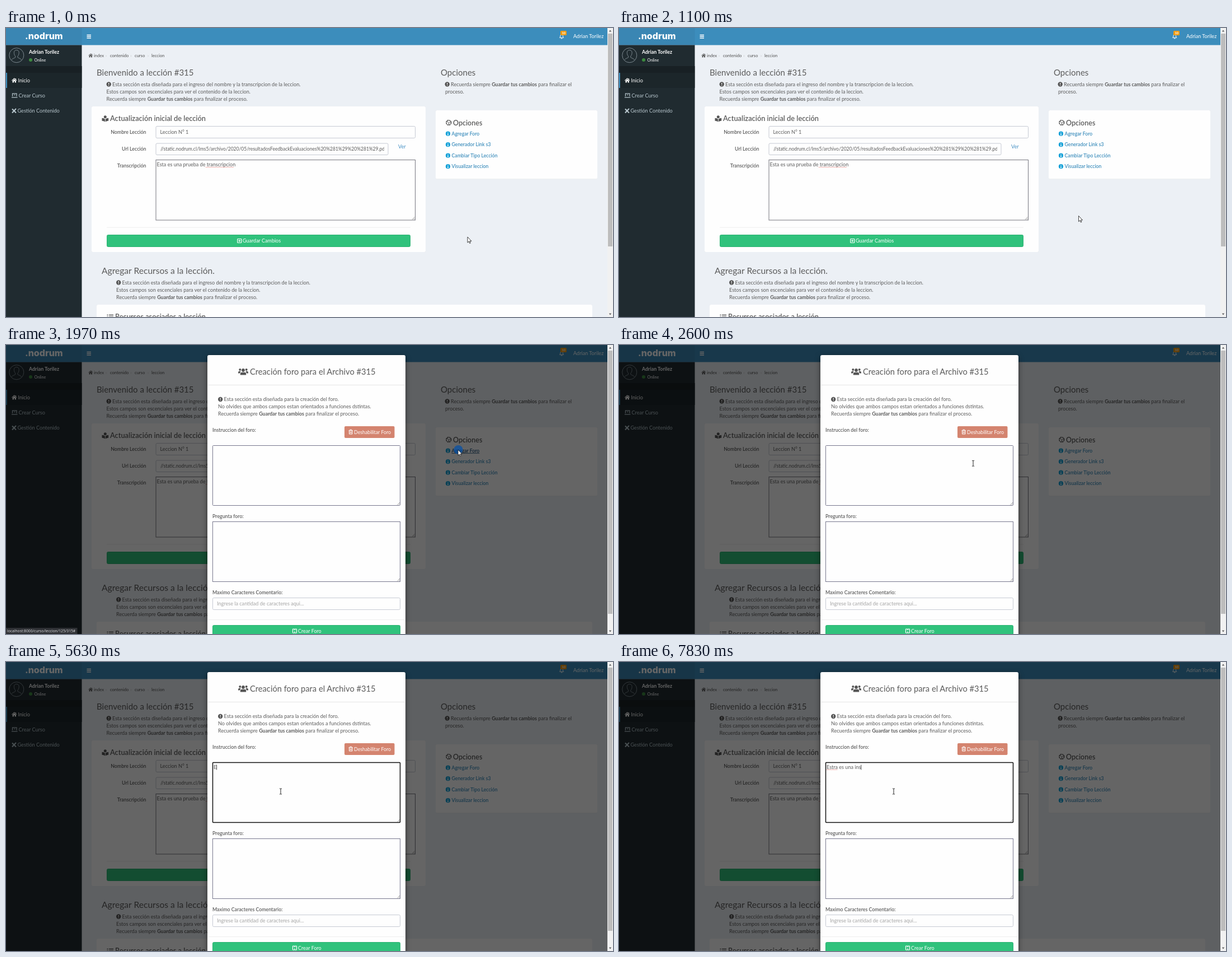
Write an HTML page that moves like this. It is 1085 by 516 pixels and loops after 8 s.

```html
<!DOCTYPE html>
<html lang="es">
<head>
<meta charset="utf-8">
<title>Lección</title>
<style>
html, body { margin: 0; width: 100%; height: 100%; overflow: hidden; background: #ecf0f5; }
svg { display: block; width: 1085px; height: 516px; }
text { font: 9.1px Lato, sans-serif; fill: #5c5c5c; white-space: pre; }
.b { font-weight: 700; font-size: 8.9px; }
.label { font-weight: 600; font-size: 8.8px; }
.end { text-anchor: end; }
.h1 { font-size: 15px; }
.h2 { font-weight: 600; font-size: 12.8px; }
.white { fill: #fff; }
.crumb { font-size: 7.6px; fill: #505050; }
.sep { font-size: 7px; fill: #bbb; }
.menu { fill: #b8c7ce; }
.link { font-weight: 600; font-size: 8.7px; fill: #3c8dbc; }
.link.on { fill: #23527c; text-decoration: underline; }
.logo { font: 800 16px Inter, sans-serif; fill: #fff; }
.card { fill: #fefefe; filter: drop-shadow(0 .7px .5px #0002); }
.field { fill: #fefefe; stroke: #c6cad3; }
.area { fill: #fefefe; stroke: #76767f; }
.modal .area { stroke: #77778e; }
.modal .area.focus { stroke: #101010; stroke-width: 1.5; }
.sheet { fill: #fefefe; filter: drop-shadow(0 3px 5px #0008); }
.btn { fill: #30c27c; stroke: #2bb272; }
.rule { stroke: #eee; }
.wavy { fill: none; stroke: #e0433a; stroke-width: .7; stroke-dasharray: 1.2 .9; }
.grip { fill: none; stroke: #777; stroke-width: .7; }
.line { fill: none; stroke: currentColor; stroke-width: 1.2; }
.status { font: 6.75px "Open Sans", sans-serif; fill: #e2e3e6; }
.pointer { fill: #fff; stroke: #111; stroke-width: .8; stroke-linejoin: round; }
</style>
</head>
<body>
<svg viewBox="0 0 1085 516">
<defs>
  <g id="warn"><circle r="4.2" fill="currentColor"/><path d="M0-2.6V.6M0 1.5V2.7" stroke="#fefefe" stroke-width="1.2"/></g>
  <g id="info"><circle r="4.1" fill="#17a2d8"/><path d="M0-2.7V-1.5M0-.7V2.5M-1 2.3H1" stroke="#fff" stroke-width="1.1"/></g>
  <path id="home" fill="currentColor" d="M0-4.2 4.7 0 4 .7 0-2.8-4 .7-4.7 0ZM0-2 3.2.8V4H.9V1.4H-.9V4H-3.2V.8ZM2.2-3.6H3.2V-1.6L2.2-2.5Z"/>
  <path id="grip" class="grip" d="M-6-1.5-1.5-6M-3.5-1.5-1.5-3.5"/>
  <rect id="box" x="-3.5" y="-3.5" width="7" height="7" rx=".8" class="line"/>
  <path id="arrow" class="pointer" d="M0 0V10.2L2.3 8 3.8 11.5 5.4 10.8 3.9 7.5H7Z"/>
  <path id="hand" class="pointer" d="M-.9.8Q0-.6.9.8V5L2.7 5.3 6 6.2Q7 6.6 6.8 8L5.6 13H.2L-2.8 8.6Q-3.2 7.2-2 7.3L-.9 8.2Z"/>
  <path id="ibeam" fill="none" stroke="#222" d="M-2-5H-.5L0-4.5.5-5H2M0-4.5V4.5M-2 5H-.5L0 4.5.5 5H2"/>
  <clipPath id="urlClip"><rect x="275" y="207" width="401" height="19"/></clipPath>
</defs>

<rect width="1085" height="516" fill="#ecf0f5"/>

<!-- top bar -->
<rect width="1075" height="30.5" fill="#3c8dbc"/>
<rect width="135.5" height="30.5" fill="#3a86b3"/>
<text class="logo" x="34" y="20">.nodrum</text>
<path d="M144.500 12.500h7.500m-7.500 2.800h7.500m-7.500 2.800h7.500" stroke="#fff" stroke-width="1.5"/>
<path d="M989.700 17.300Q991 16 991 13.700Q991.200 11.500 993.200 11.500T995.400 13.700Q995.400 16 996.700 17.300ZM992 18.800h2.400" fill="none" stroke="#fff"/>
<rect x="991" y="5" width="11" height="8" rx="1.5" fill="#f39c12"/>
<text class="white" x="993.500" y="11" style="font-size:5.6px;font-weight:700">10</text>
<text class="white" x="1014" y="18">Adrian Torilez</text>

<!-- sidebar -->
<rect y="30.500" width="135.500" height="486" fill="#202b30"/>
<rect y="68" width="135.500" height="12" fill="#182024"/>
<rect y="80" width="135.500" height="27" fill="#1c262a"/>
<rect y="80" width="2" height="27" fill="#3c8dbc"/>
<g fill="none" stroke="#87939a" stroke-width=".9">
  <circle cx="18.800" cy="48.700" r="13"/>
  <path d="M18.800 39.500c-3.600 0-4.800 2.700-4.300 6 .4 2.600 1.400 4 2.200 4.800v2.200c-1.500 1.500-5 1.600-6.700 4.300M18.800 39.500c3.600 0 4.800 2.700 4.300 6-.4 2.600-1.400 4-2.200 4.800v2.200c1.500 1.500 5 1.600 6.700 4.300"/>
</g>
<text class="white b" x="41" y="45.500">Adrian Torilez</text>
<circle cx="44" cy="57" r="3" fill="#3c8a3f"/>
<text class="white" x="50.500" y="59.500" style="font-size:7.15px">Online</text>
<use href="#home" x="14.800" y="93.500" color="#fff"/>
<text class="white" x="21.500" y="96.500">Inicio</text>
<g color="#b8c7ce">
  <path class="line" d="M11.500 122v-4.800h7.500v4.800M10 123.800h10.500M14 119.500h2.500"/>
  <path class="line" style="stroke-width:2" d="M11 144.500l7 7M18 144l-7 7.500"/>
</g>
<text class="menu" x="22.500" y="124">Crear Curso</text>
<text class="menu" x="20.500" y="151">Gestión Contenido</text>

<!-- breadcrumb -->
<use href="#home" color="#505050" transform="translate(151.300 49) scale(.85)"/>
<text class="crumb" x="157" y="52">index</text>
<text class="crumb" x="186" y="52">contenido</text>
<text class="crumb" x="230" y="52">curso</text>
<text class="crumb" x="260" y="52">leccion</text>
<text class="sep" x="178" y="51.500">›</text>
<text class="sep" x="222.500" y="51.500">›</text>
<text class="sep" x="253" y="51.500">›</text>

<!-- introductions -->
<text class="h1" x="162" y="85">Bienvenido a lección #315</text>
<g id="intro" color="#555">
  <use href="#warn" x="183.700" y="100.500"/>
  <text x="190" y="103.800">Esta sección esta diseñada para el ingreso del nombre y la transcripcion de la leccion.</text>
  <text x="179.500" y="116.800">Estos campos son escenciales para ver el contenido de la leccion.</text>
  <text x="179.500" y="129.800">Recuerda siempre <tspan class="b">Guardar tus cambios</tspan> para finalizar el proceso.</text>
</g>
<use href="#intro" x="17.500" y="354"/>
<text class="h1" x="777" y="85">Opciones</text>
<use href="#warn" x="788.700" y="100.500" color="#555"/>
<text x="795" y="103.800">Recuerda siempre <tspan class="b">Guardar tus cambios</tspan> para finalizar el</text>
<text x="785" y="116.800">proceso.</text>

<!-- lesson form -->
<rect class="card" x="153" y="140" width="597" height="260" rx="2"/>
<g fill="#555">
  <circle cx="177.300" cy="158.700" r="2.500"/>
  <path d="M171.500 160.800q3.500 0 5.400 1.700v5q-2-1.600-5.400-1.700ZM183.200 160.800q-3.500 0-5.400 1.700v5q2-1.600 5.400-1.700Z"/>
</g>
<text class="h2" x="186" y="166">Actualización inicial de lección</text>
<text class="label end" x="250.500" y="189">Nombre Lección</text>
<text class="label end" x="250.500" y="219">Url Lección</text>
<text class="label end" x="250.500" y="249">Transcripción</text>
<rect class="field" x="268" y="175.500" width="463.500" height="21" rx="2"/>
<text x="275.500" y="189">Leccion N° 1</text>
<rect class="field" x="268" y="206" width="415" height="20.500" rx="2"/>
<text x="276" y="219" clip-path="url(#urlClip)" style="font-size:8.5px">//static.nodrum.cl/lms5/archivo/2020/05/resultadosFeedbackEvaluaciones%20%281%29%20%281%29.pdf</text>
<text x="701" y="215" style="fill:#4590c4">Ver</text>
<rect class="area" x="268" y="235.500" width="463.500" height="107.500"/>
<use href="#grip" x="732" y="343.500"/>
<text x="269.500" y="247" style="font-size:9.05px">Esta es una prueba de transcripcion</text>
<path class="wavy" d="M357 248.700H406.500"/>
<path class="rule" d="M180 356H723"/>
<rect class="btn" x="180.500" y="369.500" width="542" height="21" rx="2"/>
<g color="#fff"><use href="#box" x="417.300" y="380"/><path class="line" d="M415.300 380h4m-2-2v4"/></g>
<text class="white" x="423" y="383" style="font-size:9px">Guardar Cambios</text>

<!-- resources -->
<text x="171" y="438.500" style="font-size:15.6px">Agregar Recursos a la lección.</text>
<rect class="card" x="162" y="494" width="886" height="40" rx="2"/>
<path d="M180.500 512.500h2m1.500 0h8M180.500 516h2m1.500 0h8M180.500 519.500h2m1.500 0h8" stroke="#555" stroke-width="1.700"/>
<text class="h2" x="195" y="520">Recursos asociados a lección</text>

<!-- options -->
<rect class="card" x="768" y="147" width="289" height="122.500" rx="2"/>
<circle cx="791.300" cy="169" r="4.300" fill="none" stroke="#555" stroke-width="1.700" stroke-dasharray="2.600 .8"/>
<path d="M788 166l3.500 3.500 4-3M791.500 169.500v3" fill="none" stroke="#555"/>
<text class="h2" x="799" y="173.500" style="font-size:12.5px">Opciones</text>
<g id="links">
  <use href="#info" x="790" y="188.700"/><text class="link" x="796.500" y="191.800">Agregar Foro</text>
  <use href="#info" x="790" y="208.200"/><text class="link" x="796.500" y="211.300">Generador Link s3</text>
  <use href="#info" x="790" y="227.700"/><text class="link" x="796.500" y="230.800">Cambiar Tipo Lección</text>
  <use href="#info" x="790" y="247.200"/><text class="link" x="796.500" y="250.300">Visualizar leccion</text>
</g>

<!-- forum dialog -->
<g id="modal" class="modal">
  <rect width="1075" height="516" fill="#000" fill-opacity=".6"/>
  <rect class="sheet" x="360" y="18" width="354" height="510" rx="3"/>
  <g fill="#555">
    <circle cx="424" cy="45" r="2.900"/><circle cx="418.300" cy="44" r="2"/><circle cx="429.700" cy="44" r="2"/>
    <path d="M418.800 53.500v-2q0-2.800 3-2.800h4.400q3 0 3 2.800v2ZM415 50.500v-1.500q0-2.300 2.200-2.300h2.500l-1.700 3.800ZM433 50.500v-1.500q0-2.300-2.200-2.300h-2.500l1.700 3.800Z"/>
  </g>
  <text x="436" y="53" style="font-size:14.7px">Creación foro para el Archivo #315</text>
  <path d="M361 71.500H713" stroke="#e5e5e5"/>
  <use href="#warn" x="383.200" y="97" color="#555"/>
  <text x="389.500" y="100.300">Esta sección esta diseñada para la creación del foro.</text>
  <text x="379" y="113.300">No olvides que ambos campos estan orientados a funciones dstintas.</text>
  <text x="379" y="126.300">Recuerda siempre <tspan class="b">Guardar tus cambios</tspan> para finalizar el proceso.</text>
  <text class="label" x="369" y="154.500">Instruccion del foro:</text>
  <rect x="605" y="145" width="89.500" height="21" rx="2" fill="#d4846f"/>
  <path d="M612.500 152.800h7.500M614.800 152.500v-1.200h3v1.200M613.500 153v6h5.500v-6M615.400 154.500v3M617.200 154.500v3" fill="none" stroke="#fff"/>
  <text class="white" x="622" y="158.500" style="font-size:8.8px">Deshabilitar Foro</text>
  <rect id="answer" class="area" x="369.500" y="179.500" width="335" height="107" rx="1"/>
  <use href="#grip" x="705.500" y="287"/>
  <text class="label" x="369" y="309">Pregunta foro:</text>
  <rect class="area" x="369.500" y="315.500" width="335" height="107"/>
  <use href="#grip" x="705.500" y="423"/>
  <text class="label" x="369" y="445">Maximo Caracteres Comentario:</text>
  <rect class="field" x="369.500" y="451.500" width="335" height="21" rx="2"/>
  <text x="377" y="465" style="fill:#a5a5a5">Ingrese la cantidad de caracteres aqui...</text>
  <path class="rule" d="M361 490.500H713"/>
  <rect class="btn" x="369.500" y="500.500" width="335" height="21" rx="2"/>
  <g color="#fff"><use href="#box" x="516" y="510.500"/><path class="line" d="M514.500 508.500h3M515 512.300h2"/></g>
  <text class="white" x="522" y="513.500" style="font-size:9px">Crear Foro</text>
  <text id="typed" x="371" y="190.500" style="font-size:9.05px"></text>
  <path id="typo" class="wavy" d="M371 192.300H390.500"/>
  <rect id="caret" y="183.500" width=".8" height="9" fill="#222"/>
</g>

<!-- browser parts -->
<rect x="1075" width="10" height="516" fill="#f1f1f1"/>
<rect id="thumb" x="1076" y="10" width="8" fill="#bdbdbd"/>
<path d="M1077.800 6.500l2.200-3 2.200 3ZM1077.800 509.500l2.200 3 2.200-3Z" fill="#606060"/>
<g id="status"><rect y="505" width="127.500" height="11" fill="#2f3135"/><text class="status" x="2" y="513.300">localhost:8000/curso/leccion/125/315#</text></g>
<circle id="ripple" fill="#0050ab" fill-opacity=".7"/>
<use id="cursor" href="#arrow"/>
</svg>

<script>
const LOOP = 8000, OPEN = 1950, LEAVE = 2200, FOCUS = 3065, BLINK = 532;
const PHRASE = "Estra es una ins";
const KEYS = [5630, 5800, 5930, 6070, 6270, 6470, 6530, 6570, 6630, 6830, 7000, 7200, 7430, 7430, 7630, 7830];
const $ = id => document.getElementById(id);
const links = [...document.querySelectorAll(".link")];
const show = (id, on) => $(id).setAttribute("visibility", on ? "visible" : "hidden");
const set = (id, attrs) => { for (const k in attrs) $(id).setAttribute(k, attrs[k]); };

// Waypoints: time, x, y
const PATH = [[0, 825, 373], [870, 825, 373], [1670, 808, 187], [LEAVE, 808, 187], [2950, 491, 231], [LOOP, 491, 231]];

function pointerAt(t) {
  const i = PATH.findIndex(p => p[0] > t);
  const [t0, x0, y0] = PATH[i - 1], [t1, x1, y1] = PATH[i];
  const u = (t - t0) / (t1 - t0), e = u * u * (3 - 2 * u);
  return [x0 + (x1 - x0) * e, y0 + (y1 - y0) * e];
}

function drawRipple(t) {
  const first = t >= 1820 && t < 2130, second = t >= 3030 && t < 3300;
  show("ripple", first || second);
  if (second) set("ripple", { cx: 484, cy: 224, r: 10.5 });
  else if (t < OPEN) set("ripple", { cx: 804.5, cy: 187.5, r: 8.7 });
  else set("ripple", { cx: 808.5, cy: 187, r: 8 });
}

function drawTyping(t) {
  const n = KEYS.filter(k => k <= t).length;
  $("typed").textContent = PHRASE.slice(0, n);
  $("caret").setAttribute("x", 371 + (n ? $("typed").getComputedTextLength() : 0));
  const lit = n > 0 || Math.floor((t - FOCUS) / BLINK) % 2 === 0;
  show("caret", t >= FOCUS && lit);
  show("typo", t >= 6830);
  $("answer").classList.toggle("focus", t >= FOCUS);
}

function draw(t) {
  const open = t >= OPEN, [x, y] = pointerAt(t);
  const hover = t < LEAVE && x < 882 ? links.findIndex(l => Math.abs(y - l.getAttribute("y") + 3) < 6.5) : -1;
  links.forEach((l, i) => l.classList.toggle("on", i === hover));
  show("status", hover >= 0);
  $("modal").style.display = open ? "" : "none";
  $("thumb").setAttribute("height", open ? 470 : 380);

  const overText = open && x > 369 && x < 705;
  const shape = overText ? "#ibeam" : hover >= 0 && !open ? "#hand" : "#arrow";
  set("cursor", { href: shape, x, y });
  drawRipple(t);
  drawTyping(t);
}

function tick() {
  draw(performance.now() % LOOP);
  requestAnimationFrame(tick);
}
tick();
</script>
</body>
</html>
```
